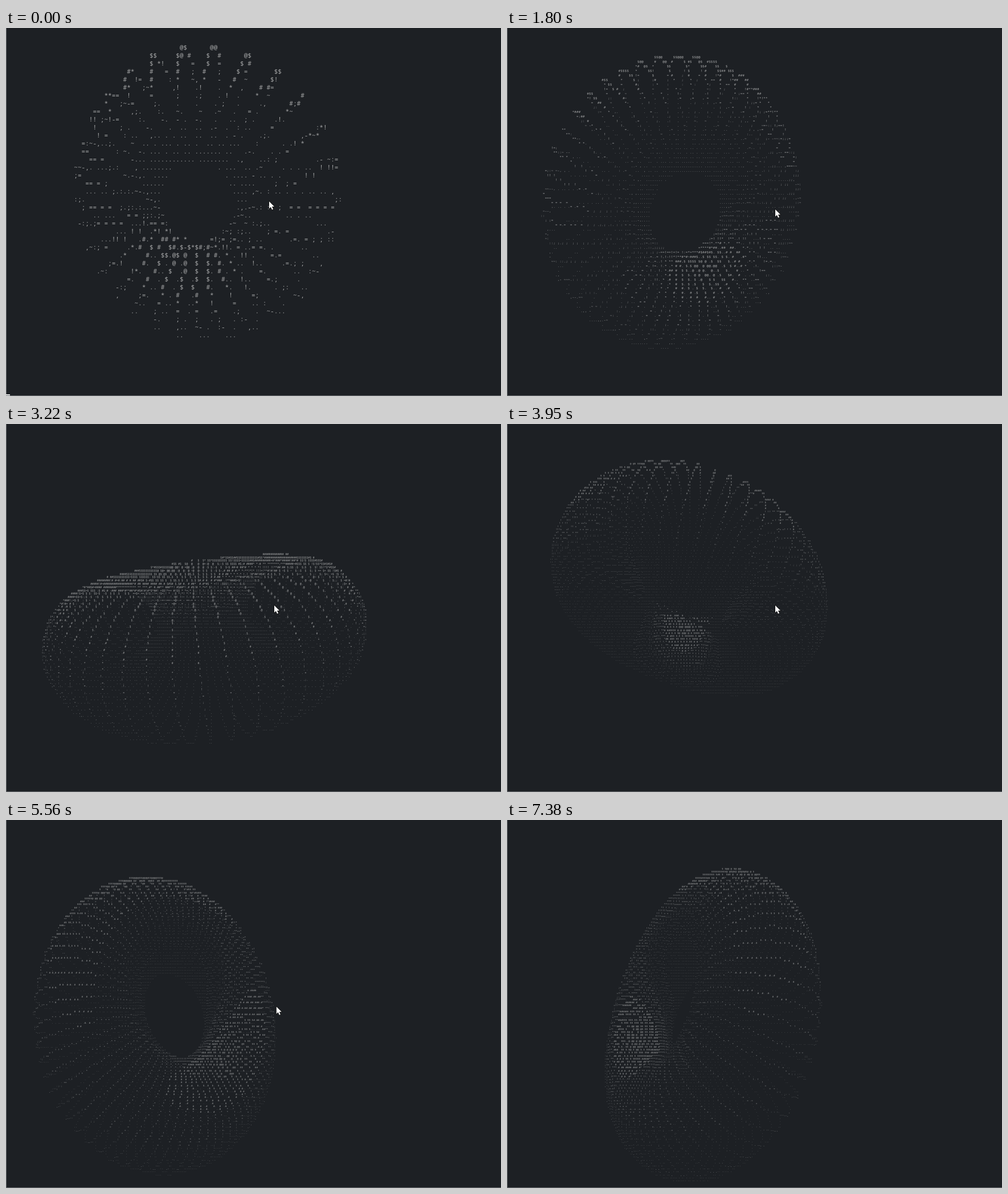
These frames come from a looping animation (869 px wide and 645 px high, 7.4 s). An HTML page with a canvas:

```html
<!DOCTYPE html>
<html>
<head>
<meta charset="utf-8">
<style>
  html, body { margin: 0; width: 100%; height: 100%; overflow: hidden; background: #1d2024; }
  canvas { display: block; }
</style>
</head>
<body>
<canvas id="term" width="869" height="645"></canvas>
<script>
const W = 869, H = 645, LOOP = 7400, RAD = Math.PI / 180;
const RAMP = '.,-~:;=!*#$@';
const ctx = document.getElementById('term').getContext('2d');

// Terminal zoom: [time, cell height, cell width, horizontal scale]
const ZOOM = [
  [0, 14, 6.63, 364], [1700, 8.1, 3.75, 355],
  [3100, 5.9, 2.9, 396], [3580, 5.2, 2.6, 344]
];

const POINTER = [
  [270, 462, 304], [420, 471, 318], [4940, 471, 318],
  [6080, 478, 335], [6470, 566, 514], [7110, 752, 638]
];

// The program prints a little faster once the first steps are through.
const stepAt = t => t < 1800 ? Math.floor(t / 138) : 13 + Math.floor((t - 1800) / 125.3);
const stepTime = n => n < 13 ? n * 138 : 1800 + (n - 13) * 125.3;

// Straight lines between key rows; the last line runs on.
function follow(keys, t) {
  let i = 1;
  while (i < keys.length - 1 && keys[i][0] < t) i++;
  const a = keys[i - 1], b = keys[i];
  const p = Math.max(0, (t - a[0]) / (b[0] - a[0]));
  return a.slice(1).map((v, j) => v + (b[j + 1] - v) * p);
}

function drawTorus(n, t) {
  const [ch, cw, kx] = follow(ZOOM, Math.min(t, 3580));
  const ky = 398, cx = 0.872 * kx + 2 * cw, cy = 353 - 3.2 * ch;

  // The spin slows down as the screen fills with more cells.
  const turn = 6.06 * n + 130 * (1 - Math.exp(-n / 20));
  const a = (turn - 253.5) * RAD, b = (129 - 0.515 * turn) * RAD;
  const sA = Math.sin(a), cA = Math.cos(a), sB = Math.sin(b), cB = Math.cos(b);

  const cols = Math.ceil(W / cw), rows = Math.ceil(H / ch);
  const depth = new Float32Array(cols * rows);
  const shade = new Uint8Array(cols * rows);
  const around = 0.218 * ch / 14, tube = 0.16 * ch / 14;

  for (let phi = 0; phi < 6.28; phi += around) {
    const sp = Math.sin(phi), cp = Math.cos(phi);
    for (let th = 0; th < 6.28; th += tube) {
      const st = Math.sin(th), ct = Math.cos(th), r = 2 + ct;
      const x = r * (cB * cp + sA * sB * sp) - st * cA * sB;
      const y = r * (sB * cp - sA * cB * sp) + st * cA * cB;
      const inv = 1 / (5 + cA * r * sp + st * sA);
      const col = Math.floor((cx + kx * x * inv) / cw);
      const row = Math.floor((cy - ky * y * inv) / ch);
      if (col < 0 || row < 0 || col >= cols || row >= rows) continue;
      const k = row * cols + col;
      if (inv <= depth[k]) continue;
      depth[k] = inv;
      const light = cp * ct * sB - cA * ct * sp - sA * st
        + cB * (cA * st - ct * sA * sp);
      shade[k] = Math.max(0, Math.min(11, Math.floor(light * 8)));
    }
  }

  ctx.font = `${cw / 0.6}px "Noto Sans Mono", "DejaVu Sans Mono", monospace`;
  ctx.textAlign = 'center';
  ctx.textBaseline = 'middle';
  ctx.fillStyle = '#a2a3a4';
  for (let k = 0; k < depth.length; k++) {
    if (!depth[k]) continue;
    ctx.fillText(RAMP[shade[k]], (k % cols + 0.5) * cw, (Math.floor(k / cols) + 0.5) * ch);
  }
}

function drawPointer(t) {
  const [x, y] = follow(POINTER, t);
  ctx.save();
  ctx.translate(x, y);
  const arrow = new Path2D('M0 0V12.5L2.9 9.8L5 14.6L7 13.7L5 9.1H9Z');
  ctx.strokeStyle = '#111';
  ctx.lineWidth = 1.4;
  ctx.stroke(arrow);
  ctx.fillStyle = '#fff';
  ctx.fill(arrow);
  ctx.restore();
}

function render(n) {
  const t = stepTime(n);
  ctx.fillStyle = '#1d2024';
  ctx.fillRect(0, 0, W, H);
  drawTorus(n, t);
  ctx.fillStyle = '#66696c';
  ctx.fillRect(0, 0, 1, H);
  ctx.fillRect(0, H - 1, W, 1);
  if (n === 0) {
    ctx.fillStyle = '#e8e8e8';
    ctx.fillRect(0, H - 3, 7, 2);
  }
  drawPointer(t);
}

let shown = -1;
const start = performance.now();
function loop() {
  const n = stepAt((performance.now() - start) % LOOP);
  if (n !== shown) render(shown = n);
  requestAnimationFrame(loop);
}
loop();
</script>
</body>
</html>
```
